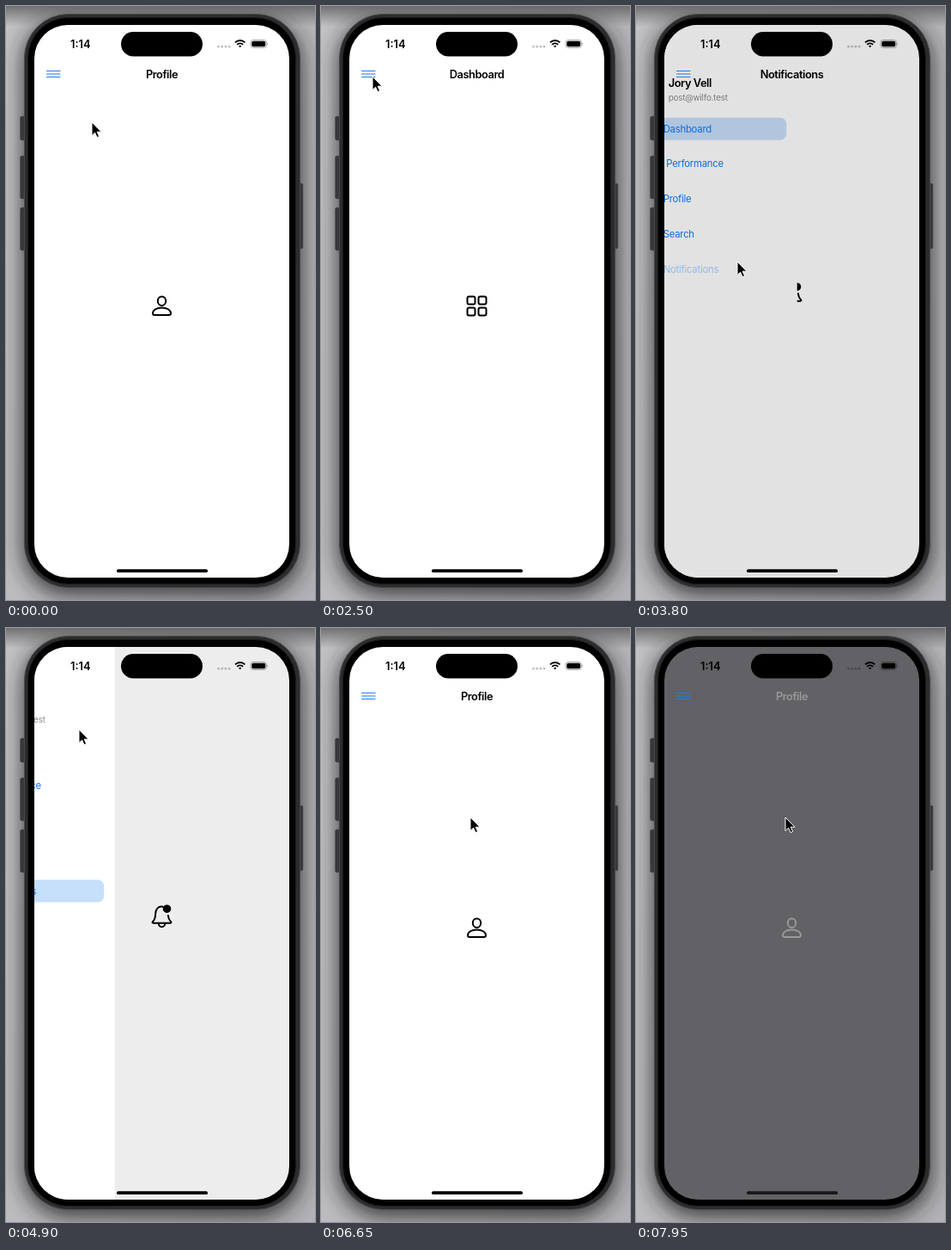
These frames come from a looping animation (360x690 px, 8 s). An HTML page:

```html
<!DOCTYPE html>
<html lang="en">
<head>
<meta charset="utf-8">
<title>Side menu</title>
<style>
  html, body { margin: 0; width: 100%; height: 100%; overflow: hidden; background: #aeaeb1; }
  svg { display: block; width: 360px; height: 690px; font-family: Inter, sans-serif; }
  .screen { --bg: #fff; --ink: #000; }
  .line { fill: none; stroke: currentColor; stroke-width: 2; stroke-linejoin: round; stroke-linecap: round; }
  .title { font-size: 12.85px; font-weight: 600; letter-spacing: -.035em; }
  .row { font-size: 11.3px; letter-spacing: -.02em; fill: #0a7aff; color: #0a7aff; }
  .mail { font-size: 9.83px; letter-spacing: -.02em; fill: #8a8a8e; }
</style>
</head>
<body>
<svg viewBox="0 0 360 690">
  <defs>
    <filter id="blur" x="-20%" y="-20%" width="140%" height="140%"><feGaussianBlur stdDeviation="13"/></filter>
    <linearGradient id="wall" x2="1" y2=".5">
      <stop offset="0" stop-color="#c3c3c6"/><stop offset="1" stop-color="#b2b2b6"/>
    </linearGradient>
    <linearGradient id="top" x2="0" y2="1">
      <stop offset="0" stop-color="#555" stop-opacity=".75"/><stop offset="1" stop-color="#555" stop-opacity="0"/>
    </linearGradient>
    <clipPath id="glass"><rect x="33" y="22" width="297" height="642" rx="39"/></clipPath>

    <g id="dashboard" class="line">
      <rect x="1" y="1" width="9" height="9" rx="2"/><rect x="14" y="1" width="9" height="9" rx="2"/>
      <rect x="1" y="14" width="9" height="9" rx="2"/><rect x="14" y="14" width="9" height="9" rx="2"/>
    </g>
    <g id="performance" class="line">
      <rect x="1" y="12" width="7" height="10" rx="1.5"/><rect x="12" y="7" width="7" height="15" rx="1.5"/>
      <rect x="23" y="2" width="7" height="20" rx="1.5"/>
    </g>
    <g id="profile" class="line">
      <ellipse cx="12" cy="6.2" rx="4.7" ry="5.2"/>
      <path d="M1.5 20.6C1.5 16.5 6 14 12 14S22.5 16.5 22.5 20.6Q22.5 22.5 20.5 22.5H3.5Q1.5 22.5 1.5 20.6Z"/>
    </g>
    <g id="search" class="line"><circle cx="10" cy="10" r="8.5"/><path d="M16.3 16.3 23 23"/></g>
    <g id="notifications" class="line">
      <path d="M13.2 1.2C8 .2 4.9 4 4.7 9C4.6 14.500 3.800 16.500 1.500 18.600Q.4 20.200 2 20.200H22Q23.600 20.200 22.500 18.600C20.600 16.700 19.600 14.500 19.400 11.500"/>
      <path d="M8.300 21a3.700 3.700 0 0 0 7.400 0"/>
      <circle cx="18" cy="3.700" r="3.800" fill="currentColor"/>
    </g>
  </defs>

  <rect width="360" height="690" fill="url(#wall)"/>
  <rect x="20" y="14" width="324" height="670" rx="52" fill="#222" opacity=".85" filter="url(#blur)"/>
  <rect width="360" height="24" fill="url(#top)"/>
  <g fill="#38383a" stroke="#555" stroke-width=".6">
    <rect x="16.500" y="128" width="7" height="28" rx="2"/><rect x="16.500" y="174" width="7" height="50" rx="2"/>
    <rect x="16.500" y="234" width="7" height="50" rx="2"/><rect x="340" y="206" width="6" height="76" rx="2"/>
  </g>
  <rect x="21.500" y="9.500" width="321" height="666" rx="51" fill="#2c2c2e" stroke="#48484a"/>
  <rect x="25.500" y="13.500" width="312" height="658" rx="47" stroke="#1c1c1d"/>

  <g class="screen" id="screen" clip-path="url(#glass)">
    <rect x="33" y="22" width="297" height="642" fill="var(--bg)"/>
    <use id="pageIcon" color="var(--ink)"/>
    <g id="layers">
      <rect id="dim" x="33" y="22" width="297" height="642"/>
      <g id="menu">
        <rect x="33" y="22" width="203" height="642" fill="#fff"/>
        <rect x="44" y="79" width="36" height="36" rx="7" fill="#0a72fb"/>
        <circle cx="62" cy="97" r="8.300" fill="#fff"/>
        <circle cx="62" cy="94.700" r="2.700" fill="#0a72fb"/>
        <path d="M56.700 101.600Q58 98.700 62 98.700T67.300 101.600Q65 104 62 104T56.700 101.600Z" fill="#0a72fb"/>
        <text x="86" y="94" class="title">Jory Vell</text>
        <text x="86" y="110" class="mail">post@wilfo.test</text>
        <rect id="mark" x="56" width="167.500" height="26" rx="7" fill="#c6dffb"/>
        <g id="rows"></g>
      </g>
    </g>
    <g id="nav">
      <path d="M47.500 75.500h15.500M47.500 79h15.500M47.500 82.500h15.500" stroke="#1c7df0" stroke-width="1.100" stroke-linecap="round"/>
      <text id="title" class="title" x="181.500" y="83.500" text-anchor="middle" fill="var(--ink)"></text>
    </g>
    <text x="75" y="48.700" class="title" style="letter-spacing:0">1:14</text>
    <path d="M247.500 47.200h14" stroke="#000" stroke-opacity=".25" stroke-width="2.800" stroke-linecap="round" stroke-dasharray="0 4.200"/>
    <g fill="none" stroke="#000" stroke-width="1.900">
      <path d="M267 42.400a8 8 0 0 1 11.400 0M269.200 44.900a4.800 4.800 0 0 1 7 0"/>
      <path d="M272.700 48.300l-1.600-1.700a2.300 2.300 0 0 1 3.200 0Z" fill="#000" stroke="none"/>
    </g>
    <rect x="285" y="39.500" width="18.600" height="9" rx="3" fill="none" stroke="#000" stroke-opacity=".4" stroke-width=".8"/>
    <rect x="286.300" y="40.800" width="16" height="6.400" rx="1.800"/>
    <path d="M304.500 42.500q1.600 1.500 0 3" fill="#000" opacity=".5"/>
    <rect x="134" y="30" width="95" height="28.500" rx="14.250"/>
    <rect id="home" x="129" y="654.300" width="106" height="3.700" rx="1.850"/>
  </g>

  <path id="cursor" d="M0 0V15.500L3.600 12.200L6 17.600L8.600 16.500L6.200 11.200H11Z" stroke="#fff" stroke-width="1"/>
</svg>
<script>
const $ = id => document.getElementById(id);
const LOOP = 8000, SLIDE = 350, PANEL = 203;
const pages = ['Dashboard', 'Performance', 'Profile', 'Search', 'Notifications'];
const rowY = i => 142.700 + i * 40.700;

// Each visit: menu opens, a row is tapped, menu closes
const visits = [
  { open: 650, close: 1760, from: 2, to: 0 },
  { open: 2650, close: 3690, from: 0, to: 4 },
  { open: 4735, close: 5960, from: 4, to: 2 }
];
// time, x, y of the pointer tip
const pointer = [
  [30, 100, 135], [450, 58, 81], [790, 58, 81], [1030, 92, 115], [1230, 100, 130],
  [1400, 100, 130], [1570, 107, 136], [1900, 107, 136], [2450, 60, 82], [2720, 60, 82],
  [3450, 118, 297], [3950, 118, 297], [4500, 57, 81], [4730, 57, 81], [4900, 85, 118],
  [5650, 174, 220]
];

$('rows').innerHTML = pages.map((name, i) => {
  const wide = name === 'Performance' ? 3.500 : 0;
  return `<g class="row"><use href="#${name.toLowerCase()}" transform="translate(62.500 ${rowY(i) - 5}) scale(.43)"/>
    <text x="${80 + wide}" y="${rowY(i) + 4}">${name}</text></g>`;
}).join('');
const rows = [...$('rows').children];

const clamp = v => Math.min(1, Math.max(0, v));
const ease = v => { v = clamp(v); return v * v * (3 - 2 * v); };
const mix = (a, b, p) => a + (b - a) * p;

function pointerAt(t) {
  const next = pointer.findIndex(k => k[0] > t);
  if (next < 1) return (next ? pointer.at(-1) : pointer[0]).slice(1);
  const a = pointer[next - 1], b = pointer[next], p = ease((t - a[0]) / (b[0] - a[0]));
  return [mix(a[1], b[1], p), mix(a[2], b[2], p)];
}

function draw(t) {
  const visit = visits.find(v => t < v.close + SLIDE) || visits[2];
  const closing = t >= visit.close;
  const shown = closing ? 1 - ease((t - visit.close) / SLIDE) : ease((t - visit.open) / SLIDE);
  const page = pages[closing ? visit.to : visit.from];

  $('menu').setAttribute('transform', `translate(${(shown - 1) * PANEL})`);
  $('menu').style.display = shown ? '' : 'none';
  $('dim').setAttribute('opacity', .15 * shown);
  // The shade covers the panel only while it slides away
  const upper = $(closing ? 'dim' : 'menu');
  if ($('layers').lastElementChild !== upper) $('layers').append(upper);
  $('mark').setAttribute('y', rowY(visit.from) - 13);
  rows.forEach((row, i) => row.setAttribute('opacity', i === visit.to && t > visit.close - 80 ? .35 : 1));

  $('nav').style.display = closing || !shown ? '' : 'none';
  $('title').textContent = page;
  $('pageIcon').setAttribute('href', '#' + page.toLowerCase());
  $('pageIcon').setAttribute('transform', `translate(169.500 ${page === 'Notifications' ? 322.500 : 336.500})`);

  // Fade towards the dark appearance
  const dark = ease((t - 7730) / 380);
  const bg = [0, 0, 8].map(c => mix(255, c, dark));
  $('screen').style.setProperty('--bg', `rgb(${bg})`);
  $('screen').style.setProperty('--ink', `rgb(${[0, 0, 0].map(() => 245 * dark)})`);
  $('home').setAttribute('fill', `rgb(${[40, 40, 44].map(c => c * dark)})`);

  $('cursor').setAttribute('transform', `translate(${pointerAt(t)})`);
}

const start = performance.now();
(function frame() {
  draw((performance.now() - start) % LOOP);
  requestAnimationFrame(frame);
})();
</script>
</body>
</html>
```
